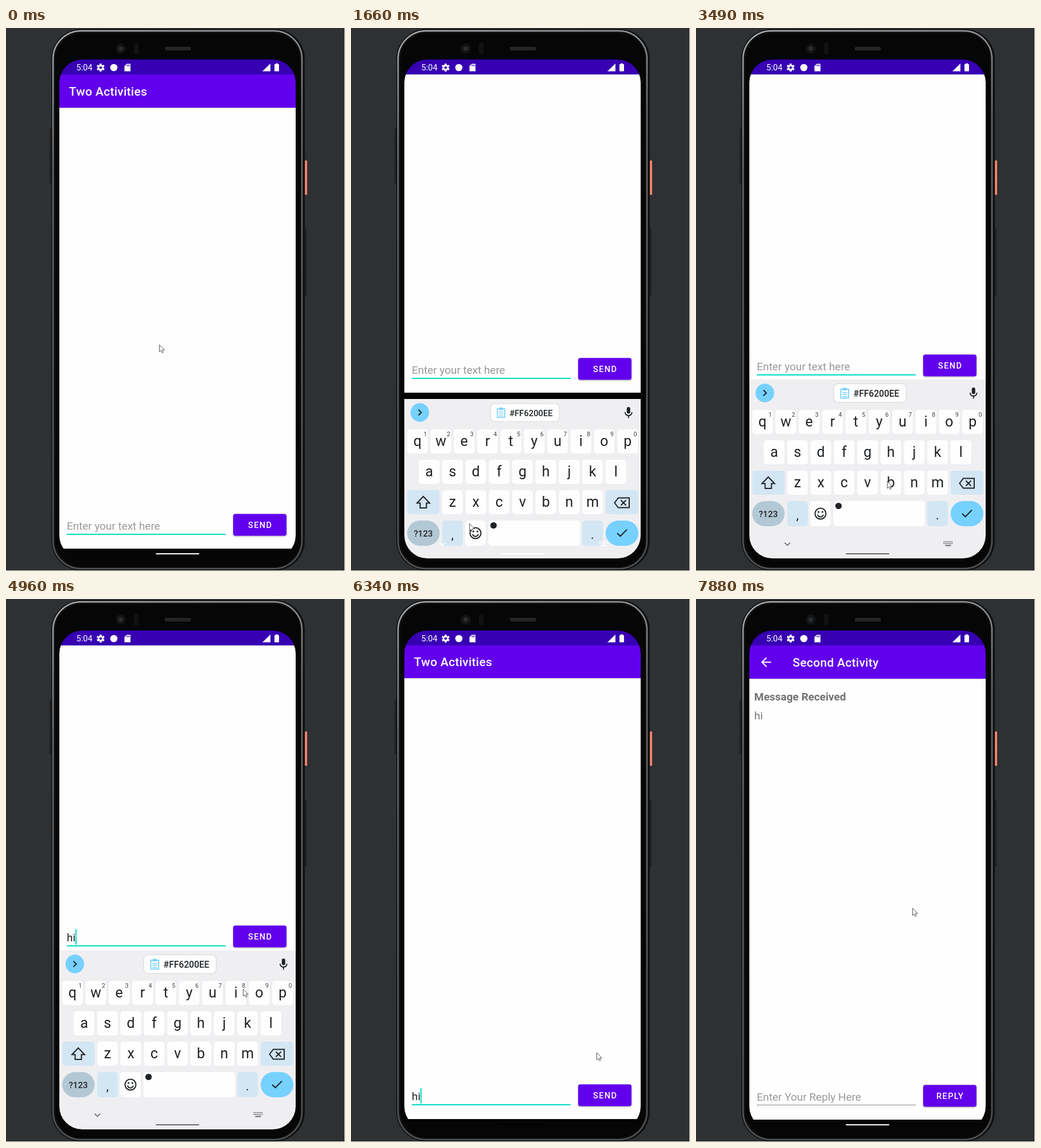
These frames come from a looping animation (591 px wide and 947 px high, 8 s). An HTML page with a canvas:

```html
<!DOCTYPE html>
<html lang="en">
<head>
<meta charset="utf-8">
<title>Two Activities</title>
<style>
  html, body { margin: 0; height: 100%; overflow: hidden; background: #2e3032; }
  canvas { display: block; }
</style>
</head>
<body>
<canvas id="stage" width="591" height="947"></canvas>
<script>
const ctx = document.getElementById('stage').getContext('2d');
const LOOP = 8000, STEP = 120, TRAVEL = 360;
const PURPLE = '#6200ee', STATUS = '#3700b3', TEAL = '#03dac5', PAPER = '#fefefe', INK = '#1f2326';
const SKY = '#76d1ff', PALE = '#d3e6f3';

const SHOW_KEYS = 1540, PRESS_H = 3970, TYPE_H = 4280, PRESS_I = 4840, TYPE_I = 4960;
const PRESS_DONE = 6070, HIDE_KEYS = 6220, PRESS_SEND = 7060, OPEN = 7220, OPENED = 7700;

// The picture is held for one STEP at a time; the count restarts at each scene.
const scenes = [0, SHOW_KEYS, 2890, TYPE_H, PRESS_I, 5380, HIDE_KEYS, OPEN, 7880];
function snap(t) {
  const start = scenes.findLast(s => s <= t);
  return start + Math.floor((t - start) / STEP) * STEP;
}

// Pointer stops: arrival time, x, y. Each trip takes at most TRAVEL.
const stops = [[0, 267, 552], [120, 266, 665], [900, 206, 864], [2620, 234, 887], [3490, 333, 790],
  [3850, 339, 738], [4520, 413, 680], [5620, 447, 837], [5770, 463, 837], [6340, 428, 791],
  [6580, 442, 856], [7820, 442, 856], [7880, 377, 539]];
function pointerAt(t) {
  const i = stops.findIndex(s => s[0] > t);
  if (i < 0) return stops.at(-1).slice(1);
  const [t0, x0, y0] = stops[i - 1], [t1, x1, y1] = stops[i];
  const p = ramp(t, Math.max(t0, t1 - TRAVEL), t1);
  return [x0 + (x1 - x0) * p, y0 + (y1 - y0) * p];
}

// The caret blinks once a second and starts again on focus and on each letter.
function caretVisible(t) {
  const start = [120, 1900, TYPE_H, TYPE_I].findLast(s => s <= t);
  return (t - start) % 1000 < 500;
}

const ramp = (t, a, b) => Math.max(0, Math.min(1, (t - a) / (b - a)));
const within = (t, a, b) => t >= a && t < b;
const decay = (t, start, tau) => Math.exp(-(t - start) / tau);

function rect(x, y, w, h, color, r = 0) {
  ctx.fillStyle = color;
  ctx.beginPath();
  ctx.roundRect(x, y, w, h, r);
  ctx.fill();
}
function circle(x, y, r, color) {
  rect(x - r, y - r, 2 * r, 2 * r, color, r);
}
function trace(points) {
  ctx.beginPath();
  for (let i = 0; i < points.length; i += 2) ctx.lineTo(points[i], points[i + 1]);
}
function poly(points, color) {
  trace(points);
  ctx.fillStyle = color;
  ctx.fill();
}
function line(points, color, width = 2, close = false) {
  trace(points);
  if (close) ctx.closePath();
  ctx.strokeStyle = color;
  ctx.lineWidth = width;
  ctx.stroke();
}
function chevron(x, y, dx, dy, color, width) {
  const size = Math.abs(dx + dy);
  const tip = [x + dx / 2, y + dy / 2], tail = [x - dx / 2, y - dy / 2];
  const [sx, sy] = dx ? [0, size] : [size, 0];
  line([tail[0] - sx, tail[1] - sy, ...tip, tail[0] + sx, tail[1] + sy], color, width);
}
function arc(x, y, r, from, to, color, width = 2) {
  ctx.strokeStyle = color;
  ctx.lineWidth = width;
  ctx.beginPath();
  ctx.arc(x, y, r, from, to);
  ctx.stroke();
}
function text(str, x, y, size, color, { weight = 400, spacing = 0, align = 'left' } = {}) {
  ctx.font = `${weight} ${size}px Roboto, sans-serif`;
  ctx.letterSpacing = spacing + 'px';
  ctx.textAlign = align;
  ctx.fillStyle = color;
  ctx.fillText(str, x, y);
}
function raised(blur, dy, alpha, draw) {
  ctx.save();
  ctx.shadowColor = `rgba(0,0,0,${alpha})`;
  ctx.shadowBlur = blur;
  ctx.shadowOffsetY = dy;
  draw();
  ctx.restore();
}
function scaled(s, cx, cy, draw) {
  ctx.save();
  ctx.translate(cx, cy);
  ctx.scale(s, s);
  ctx.translate(-cx, -cy);
  draw();
  ctx.restore();
}

function phone() {
  rect(0, 0, 591, 947, '#e6e6e6');
  rect(0, 0, 590, 946, '#2e3032');
  rect(76, 175, 3, 96, '#1f2021', 1);
  rect(521, 350, 3, 117, '#202123', 1);
  rect(521, 231, 4, 60, '#f0806a', 1);
  rect(79, 2, 442, 944, '#101112', 52);
  const rim = ctx.createLinearGradient(79, 0, 300, 947);
  rim.addColorStop(0, '#b0b1b2');
  rim.addColorStop(.25, '#6a6b6c');
  rim.addColorStop(1, '#515253');
  ctx.beginPath();
  ctx.roundRect(82, 5, 434, 938, 49);
  ctx.strokeStyle = rim;
  ctx.lineWidth = 2.5;
  ctx.stroke();
  rect(86, 9, 427, 931, '#060607', 46);
  circle(200, 36, 9, '#121314');
  circle(200, 36, 4, '#2b2d2f');
  rect(223, 26, 8, 20, '#101112', 3);
  rect(277, 33, 45, 6, '#2b2b2c', 2);
  for (let x = 279; x < 321; x += 3) rect(x, 34, 1, 4, '#151515');
}

function statusIcons() {
  text('5:04', 122.5, 74.3, 14.7, '#fff');
  arc(165, 69, 3.7, 0, 7, '#fff', 3);
  for (let a = Math.PI / 6; a < 6.5; a += Math.PI / 3) {
    const c = Math.cos(a), s = Math.sin(a);
    line([165 + 4 * c, 69 + 4 * s, 165 + 7 * c, 69 + 7 * s], '#fff', 3.4);
  }
  circle(188, 69, 6.3, '#fff');
  poly([210.5, 62.5, 217, 62.5, 217, 75.5, 206.5, 75.5, 206.5, 66.5], '#fff');
  for (let x = 210.3; x < 215; x += 2.1) rect(x, 64, 1.1, 2.8, STATUS);
  ctx.beginPath();
  ctx.moveTo(438, 75.5);
  ctx.arc(438, 75.5, 13, -2.43, -.71);
  ctx.fill();
  poly([447, 75.5, 461, 75.5, 461, 62], '#fff');
  rect(468, 63, 8, 12.5, '#fff', 1);
  rect(470, 61.8, 4, 2, '#fff');
}

function appWindow(title, titleX, pan, drawBody) {
  rect(93, 55, 412, 870, '#050505');
  rect(93, 55, 412, 26, STATUS);
  ctx.save();
  ctx.beginPath();
  ctx.rect(93, 81, 412, 844);
  ctx.clip();
  ctx.translate(0, -Math.round(pan));
  rect(93, 139, 412, 769, PAPER);
  raised(2, .5, .2, () => rect(93, 81, 412, 58, PURPLE));
  text(title, titleX, 118.4, 21, '#fff', { weight: 500, spacing: .26 });
  drawBody();
  ctx.restore();
}

function button(label, pressed) {
  const height = pressed ? 3 : 1;
  const shape = color => rect(396, 847.5, 93, 38, color, 4);
  raised(3 * height, height, .35, () => shape(PURPLE));
  if (pressed) shape('rgba(255,255,255,.25)');
  text(label, 443.2, 872.2, 14.7, '#fff', { weight: 500, spacing: 1.31, align: 'center' });
}

function field(hint, typed, underline, thickness) {
  text(typed || hint, 106, 875, 18.9, typed ? '#212121' : '#999');
  rect(106, 882, 277, thickness, underline);
}

function mainScreen(t, pan) {
  appWindow('Two Activities', 109.8, pan, () => {
    const typed = t < TYPE_H ? '' : t < TYPE_I ? 'h' : 'hi';
    field('Enter your text here', typed, TEAL, 2);
    const caretX = 106 + (typed && ctx.measureText(typed).width);
    if (caretVisible(t)) rect(caretX, 854, 2, 27, TEAL);
    button('SEND', t >= PRESS_SEND);
  });
}

function replyScreen() {
  appWindow('Second Activity', 168.5, 0, () => {
    line([131, 110.3, 115.5, 110.3], '#fff');
    chevron(119, 110.3, -8, 0, '#fff');
    text('Message Received', 101.6, 176.6, 18.9, '#727272', { weight: 700 });
    text('hi', 101.6, 210, 18.9, '#757575');
    field('Enter Your Reply Here', '', '#868686', 1);
    button('REPLY', false);
  });
}

// Three centred rows of letter keys
const keys = ['qwertyuiop', 'asdfghjkl', 'zxcvbnm'].flatMap((row, r) =>
  [...row].map((letter, i) => ({
    letter,
    x: 299 + (i - (row.length - 1) / 2) * 40.7,
    top: 666 + r * 53,
    digit: r ? '' : (i + 1) % 10,
  })));

function drawKey({ letter, x, top, digit }) {
  rect(x - 18, top, 36, 42, PAPER, 5);
  text(letter, x, top + 28.6, 25, INK, { align: 'center' });
  text(digit, x + 13.5, top + 12, 10.5, '#3c4043', { align: 'center' });
}
function keyPopup(pressed) {
  const { letter, x, top } = keys.find(k => k.letter === pressed);
  raised(9, 2, .3, () => rect(x - 25, top - 46, 50, 64, '#fff', 8));
  text(letter, x, top - 4, 33, INK, { align: 'center' });
}

function clipboardChip() {
  rect(239.5, 620, 127.5, 33.5, '#d6d7da', 8);
  rect(240.5, 621, 125.5, 31.5, PAPER, 7);
  ctx.strokeStyle = SKY;
  ctx.lineWidth = 1.8;
  ctx.strokeRect(252.5, 630, 13.5, 15.5);
  rect(256, 627.5, 6.5, 4.5, SKY, 1);
  for (let y = 635; y < 643; y += 3.5) rect(255.5, y, 8, 1.4, SKY);
  text('#FF6200EE', 314.5, 643, 15.6, INK, { weight: 500, align: 'center' });
}

function keyboard(t, chipScale) {
  rect(93, 613, 412, 340, '#efeff2');
  circle(120, 636.5, 16.2, SKY);
  chevron(120, 636.5, 5, 0, INK);
  scaled(chipScale, 303.5, 637, clipboardChip);
  rect(480.8, 627, 6, 11.5, INK, 3);
  arc(483.8, 636, 6, 0, Math.PI, INK, 1.8);
  rect(482.9, 642, 1.8, 4.5, INK);

  keys.forEach(drawKey);

  rect(98, 772, 56.5, 42, PALE, 5);
  line([126, 783, 137, 794.5, 131.5, 794.5, 131.5, 803, 120.5, 803, 120.5, 794.5, 115, 794.5], INK, 2, true);
  rect(444, 772, 57, 42, PALE, 5);
  line([459.5, 794, 466, 785.5, 485, 785.5, 485, 802.5, 466, 802.5], INK, 2, true);
  for (const d of [-4.5, 4.5]) line([475 - d, 794 - 4.5, 475 + d, 794 + 4.5], INK);

  rect(98, 825, 56.5, 44, '#b3c8d5', 22);
  text('?123', 126, 852.8, 15, INK, { weight: 500, align: 'center' });
  for (const [mark, x] of [[',', 177], ['.', 421]]) {
    rect(x - 18, 825, 36, 44, PALE, 5);
    text(mark, x, 857, 22, INK, { align: 'center' });
  }
  rect(199, 825, 36, 44, PAPER, 5);
  arc(217, 847, 9.5, 0, 7, INK);
  arc(217, 847.5, 5.2, .25, Math.PI - .25, INK);
  for (const d of [-3.4, 3.4]) circle(217 + d, 844, 1.6, INK);
  rect(239.5, 825, 159.5, 44, PAPER, 5);
  circle(248.5, 833.5, 5.6, INK);
  rect(444, 825, 57, 44, t >= PRESS_DONE ? '#5fb2dc' : SKY, 22);
  line([464, 847, 469.5, 852.3, 481, 840.8], INK);

  if (within(t, PRESS_H, TYPE_H)) keyPopup('h');
  if (within(t, PRESS_I, TYPE_I)) keyPopup('i');
}

function navigation(dark, withKeys) {
  const v = Math.round(255 * (1 - dark));
  const color = `rgba(${v},${v},${v},${1 - .45 * dark})`;
  rect(261, 916, 76, 2, color, 1);
  if (!withKeys) return;
  chevron(159.3, 900, 0, 4.8, color, 1.6);
  for (let x = 431.5; x < 447; x += 2.8) for (const y of [895, 898.3]) rect(x, y, 1.8, 1.8, color);
  rect(434.5, 901.6, 10, 1.8, color);
}

function pointer(x, y) {
  const outline = [.5, .5, .5, 12.8, 3.3, 10.2, 5.2, 14.5, 7.3, 13.5, 5.4, 9.4, 9.3, 9.4];
  ctx.save();
  ctx.translate(Math.round(x), Math.round(y));
  poly(outline, '#fff');
  line(outline, '#444', .9, true);
  ctx.restore();
}

function draw(t) {
  phone();
  ctx.save();
  ctx.beginPath();
  ctx.roundRect(93, 55, 412, 870, 40);
  ctx.clip();

  const typing = within(t, SHOW_KEYS, HIDE_KEYS), keysShown = within(t, SHOW_KEYS, HIDE_KEYS + STEP);
  if (t < OPEN) {
    const panned = typing ? 1 - decay(t, 1480, 47) : t >= HIDE_KEYS ? decay(t, 6180, 28) : 0;
    mainScreen(t, 278 * panned);
    if (keysShown) {
      const hidden = typing ? decay(t, 1480, 81) : .5;
      ctx.save();
      ctx.translate(0, Math.round(312 * hidden));
      keyboard(t, 1 - hidden / 2);
      ctx.restore();
    }
  } else if (t < OPENED) {
    const rest = decay(t, OPEN - 40, 110);
    scaled(1.05 - .08 * rest, 299, 490, () => mainScreen(t, 0));
    rect(93, 55, 412, 870, 'rgba(0,0,0,.3)');
    scaled(1 - .15 * rest, 299, 490, replyScreen);
  } else {
    replyScreen();
  }

  statusIcons();
  navigation(ramp(t, 2770, 3490) - ramp(t, 6340, 6940), keysShown);
  ctx.restore();
  pointer(...pointerAt(t));
}

function tick() {
  draw(snap(performance.now() % LOOP));
  requestAnimationFrame(tick);
}
tick();
</script>
</body>
</html>
```
